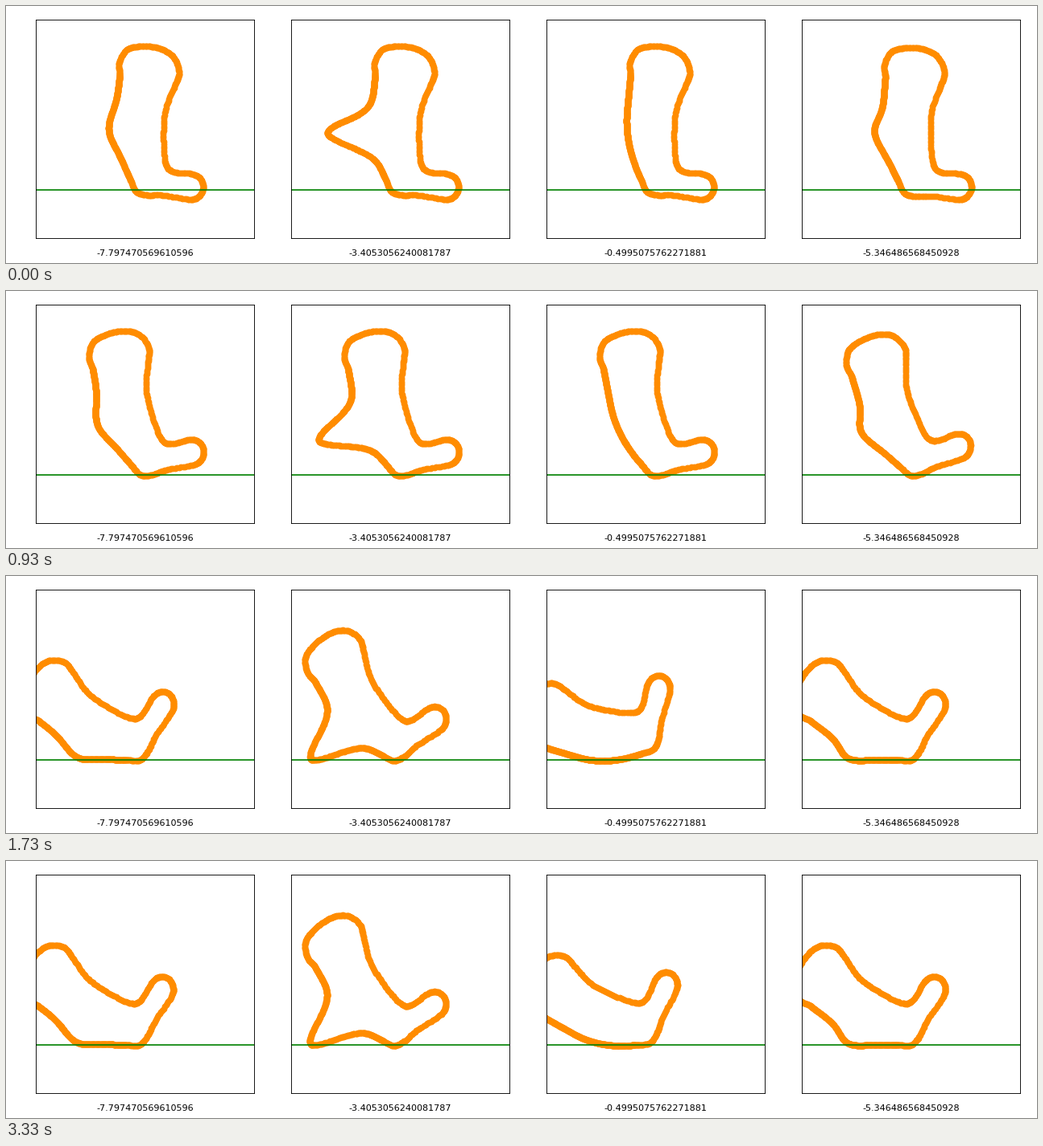
A matplotlib script that plays this animation: 1280x320 px, repeating every 3.36 s.

```python
import numpy as np
import matplotlib.pyplot as plt
from matplotlib.animation import FuncAnimation

plt.rcParams["font.family"] = "DejaVu Sans"

W, H, DPI = 1280, 320, 80
FRAMES, LOOP = 101, 3360
LEFT, PITCH, BOX_W = 37.2, 317.0, 271.0
TOP, BOTTOM = 17.3, 289.3
GROUND, REST = 229, 230
SQUEEZE = 0.91  # horizontal data units are drawn narrower than vertical ones

# Key points of the leg, from the upper back over the top down to the instep.
LEG = [(92, 70), (99, 54), (112, 48), (130, 46), (147, 49), (160, 58),
       (167, 75), (163, 92), (154.5, 122), (155, 155), (160.5, 188), (171, 198)]
SOLE = [(162, 228.5), (140, 230.5), (127, 227)]
HEEL = (132, 10)  # tracked body point: x and height above the sole

# bulge: depth, y of its tip, spread above, spread below
# lean: tilt at the start; pace: speed of the fall; rest: tilt after landing
# rock: extra tilt while rocking back; heel: start x; slide: drift on landing
PANELS = [
    dict(label="-7.797470569610596", bulge=(9.5, 156, 21, 17),
         lean=5.8, pace=1.0, rest=56, rock=0, heel=130.5, slide=16),
    dict(label="-3.4053056240081787", bulge=(56, 165, 18, 11.5),
         lean=5.8, pace=1.0, rest=33, rock=0, heel=130.5, slide=9.5),
    dict(label="-0.4995075762271881", bulge=(0, 160, 15, 15),
         lean=5.8, pace=1.0, rest=63, rock=12, heel=130.5, slide=18.5),
    dict(label="-5.346486568450928", bulge=(11, 155, 15, 19),
         lean=4.2, pace=1.57, rest=56, rock=0, heel=133, slide=11),
]


def toe_arc():
    a = np.radians(np.linspace(-90, 90, 5))
    return np.column_stack([194 + 16 * np.cos(a), 214 + 16 * np.sin(a)])


def back_edge(depth, tip, above, below):
    """Calf line flaring into the heel, pushed out by a lopsided bell."""
    y = np.linspace(214, 84, 20)
    line = 94 + (np.maximum(y - 130, 0) / 16.7) ** 2
    spread = np.where(y < tip, above, below)
    bell = depth * np.exp(-((y - tip) / spread) ** 2 / 2)
    return np.column_stack([line - bell, y])


def closed_spline(p1, samples=14):
    """Closed Catmull-Rom curve through the points."""
    p1 = p1[:, None, :]
    p0, p2, p3 = (np.roll(p1, k, axis=0) for k in (1, -1, -2))
    u = (np.arange(samples) / samples)[None, :, None]
    curve = 0.5 * (2 * p1 + (p2 - p0) * u
                   + (2 * p0 - 5 * p1 + 4 * p2 - p3) * u ** 2
                   + (3 * p1 - p0 - 3 * p2 + p3) * u ** 3)
    return curve.reshape(-1, 2)


def outline(bulge):
    """Upright outline as x and height above the sole."""
    points = np.vstack([LEG, toe_arc(), SOLE, back_edge(*bulge)])
    x, y = closed_spline(points).T
    return x, REST - y


def motion(step, p):
    """Tilt in degrees and heel x: spring up, topple, land, slide, rock."""
    reach = 31 * p["pace"]
    fall = reach * (max(step - 10, 0) / 24) ** 2.8
    landing = 10 + 24 * (p["rest"] / reach) ** (1 / 2.8)
    since = max(step - landing, 0)
    rock = p["rock"] * np.sin(np.pi * min(since / 20, 1))
    tilt = min(fall, p["rest"]) + rock - p["lean"] * np.exp(-step / 3)
    heel = p["heel"] + 0.19 * tilt - p["slide"] * (1 - np.exp(-since / 4))
    return tilt, heel


def rotate(x, up, tilt):
    a = np.radians(tilt)
    return (x * np.cos(a) - SQUEEZE * up * np.sin(a),
            x * np.sin(a) / SQUEEZE + up * np.cos(a))


fig = plt.figure(figsize=(W / DPI, H / DPI), dpi=DPI, facecolor="white")
feet = []
for n, panel in enumerate(PANELS):
    x0 = LEFT + n * PITCH
    ax = fig.add_axes([x0 / W, 1 - BOTTOM / H, BOX_W / W, (BOTTOM - TOP) / H])
    ax.set(xlim=(0, BOX_W), ylim=(BOTTOM, TOP), xticks=[], yticks=[])
    ax.axhline(GROUND, color="green", lw=1.5)
    dots = ax.scatter([], [], color="darkorange")
    fig.text((x0 + BOX_W / 2) / W, 1 - 311 / H, panel["label"],
             fontsize=10, ha="center", va="baseline")
    feet.append((dots, outline(panel["bulge"]), panel))


def draw(step):
    # The foot starts sunk into the ground and is pushed out.
    floor = REST + 10.8 * np.exp(-step / 3)
    for dots, shape, panel in feet:
        tilt, heel = motion(step, panel)
        x, up = rotate(*shape, tilt)
        x += heel - rotate(*HEEL, tilt)[0]
        dots.set_offsets(np.column_stack([x, floor - (up - up.min())]))
    return [foot[0] for foot in feet]


anim = FuncAnimation(fig, draw, frames=FRAMES, interval=LOOP / FRAMES,
                     repeat=True, repeat_delay=0, blit=False)
plt.show()
```
